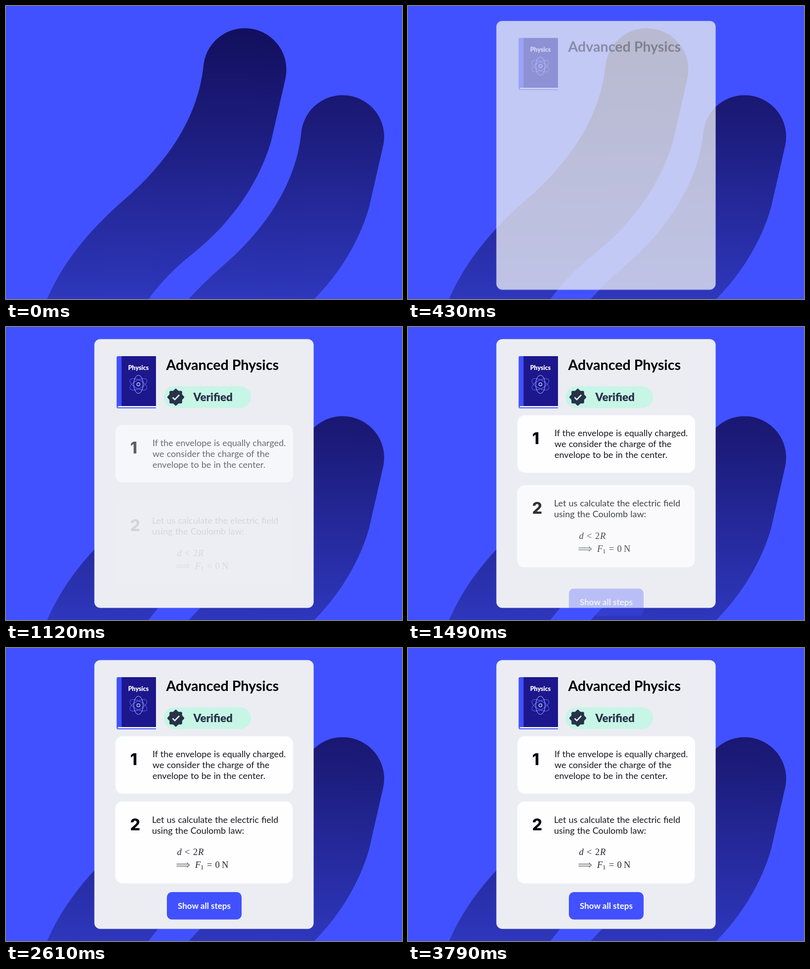
Write an HTML page that moves like this. It is 800x593 px and loops after 3850 ms.

```html
<!DOCTYPE html>
<html lang="en">
<head>
<meta charset="utf-8">
<title>Solution card</title>
<style>
  html, body { margin: 0; width: 100%; height: 100%; overflow: hidden; background: #4151ff; }
  svg { display: block; width: 100%; height: 100%; }
  text { font-family: Lato, "Open Sans", sans-serif; }
  .body { font-size: 18px; word-spacing: .5px; fill: #17171c; }
  .step { font: 800 32px Inter, sans-serif; text-anchor: middle; }
  .math { font: 18.5px "Liberation Serif", serif; fill: #26282e; }
  .math .var { font-style: italic; }
  .panel { fill: #fefdff; }
</style>
</head>
<body>
<svg viewBox="0 0 800 593">
  <defs>
    <linearGradient id="shade" gradientUnits="userSpaceOnUse" x1="0" y1="45" x2="0" y2="593">
      <stop offset="0" stop-color="#120f5e"/>
      <stop offset=".32" stop-color="#1b1a78"/>
      <stop offset="1" stop-color="#2e37bc"/>
    </linearGradient>
    <clipPath id="ribbons">
      <path id="ribbon" d="M83 593C120 508 178 445 240 391C330 313 388 222 398.7 123A84 84 0 0 1 482.5 45A84 84 0 0 1 564.5 147L536 272C518 336 472 428 369 508C339 532 310 563 288 593Z"/>
      <use href="#ribbon" x="197.5" y="135.5"/>
    </clipPath>
  </defs>

  <rect width="800" height="593" fill="#4151ff"/>
  <rect width="800" height="593" fill="url(#shade)" clip-path="url(#ribbons)"/>

  <g id="sheet">
    <rect id="card" x="178.5" y="24.5" width="443" height="544" rx="12" fill="#ebedf2"/>
    <g id="header">
      <path d="M226 59H303V164.5H226Q223.5 164.5 223.5 161V62Q223.5 59 226 59Z" fill="#4151ff"/>
      <path d="M303 160H228Q225 160.5 225.5 162.5H303Z" fill="#fff"/>
      <rect x="233.5" y="59" width="69.5" height="101" fill="#1c178c"/>
      <text x="267.5" y="87" font-size="12.4" font-weight="900" text-anchor="middle" fill="#fff">Physics</text>
      <g transform="translate(267.5 116)" fill="none" stroke="#5967f5">
        <ellipse rx="8.5" ry="19" transform="rotate(62)"/>
        <ellipse rx="8.5" ry="19" transform="rotate(-62)"/>
        <ellipse rx="9.5" ry="18.5" stroke="#b4bbff"/>
        <circle r="3.2" stroke="#d5d9ff" stroke-width="1.2"/>
      </g>
      <text x="323.5" y="87" font-size="28.6" font-weight="700">Advanced Physics</text>
    </g>
  </g>

  <rect id="pill" x="318" y="120" width="177" height="44" rx="22" fill="#c7f5e6"/>
  <g transform="translate(343 142)">
    <g id="badge">
      <g fill="#273249">
        <rect x="-12.8" y="-12.8" width="25.6" height="25.6" rx="2.5"/>
        <rect x="-12.8" y="-12.8" width="25.6" height="25.6" rx="2.5" transform="rotate(45)"/>
      </g>
      <path d="M-6.5 .5L-2 5L7-4.5" fill="none" stroke="#dcf8ef" stroke-width="2.6"/>
    </g>
  </g>
  <text id="verified" x="378.5" y="149.5" font-size="22.3" font-weight="900" fill="#273249">Verified</text>

  <g id="first">
    <rect class="panel" x="221" y="178.5" width="359" height="116.5" rx="15"/>
    <text class="step" x="258" y="236.5">1</text>
    <text class="body" y="221">
      <tspan x="296">If the envelope is equally charged.</tspan>
      <tspan x="296" dy="22">we consider the charge of the</tspan>
      <tspan x="296" dy="22">envelope to be in the center.</tspan>
    </text>
  </g>

  <g id="second">
    <rect class="panel" x="220.5" y="310.5" width="359" height="166" rx="15"/>
    <text class="step" x="261" y="368.5">2</text>
    <text class="body" y="353.5">
      <tspan x="295">Let us calculate the electric field</tspan>
      <tspan x="295" dy="22">using the Coulomb law:</tspan>
    </text>
    <text class="math" y="419"><tspan class="var" x="345.5">d</tspan><tspan x="361">&lt;</tspan><tspan x="378">2</tspan><tspan class="var" x="388">R</tspan></text>
    <path d="M344.5 437.3H368.5M344.5 441.3H368.5M365.5 434Q367.5 438 371 439.3Q367.5 440.6 365.5 444.6" fill="none" stroke="#26282e"/>
    <text class="math" y="445"><tspan class="var" x="382">F</tspan><tspan x="393" dy="3" font-size="13">1</tspan><tspan x="406" dy="-3">=</tspan><tspan x="422.5">0</tspan><tspan x="436">N</tspan></text>
  </g>

  <g id="button">
    <rect x="325" y="494" width="151" height="55.5" rx="10" fill="#4151ff"/>
    <text x="400.5" y="527.5" font-size="17" font-weight="700" text-anchor="middle" fill="#fff">Show all steps</text>
  </g>
</svg>
<script>
  const LOOP = 3850;
  const hidden = { opacity: 0 }, shown = { opacity: 1 };
  const shift = y => ({ transform: `translateY(${y}px)` });
  const below = { ...hidden, ...shift(50) }, settled = { ...shown, ...shift(0) };

  // id, start ms, end ms, from, to, easing
  const moves = [
    ['sheet', 20, 550, shift(25), shift(0)],
    ['card', 20, 550, hidden, shown],
    ['header', 265, 795, hidden, shown],
    ['pill', 480, 690, { ...hidden, width: '44px' }, { ...shown, width: '177px' }, 'ease-out'],
    ['badge', 640, 860, { transform: 'rotate(-180deg) scale(0)' }, { transform: 'rotate(0deg) scale(1)' }, 'ease-out'],
    ['verified', 800, 1060, hidden, shown],
    ['first', 800, 1330, below, settled],
    ['second', 1065, 1595, below, settled],
    ['button', 1335, 1865, below, settled],
  ];

  for (const [id, start, end, from, to, easing = 'linear'] of moves) {
    const animation = document.getElementById(id).animate([
      { ...from, offset: 0 },
      { ...from, offset: start / LOOP, easing },
      { ...to, offset: end / LOOP },
      { ...to, offset: 1 },
    ], { duration: LOOP, iterations: Infinity });
    animation.startTime = 0;
  }
</script>
</body>
</html>
```
